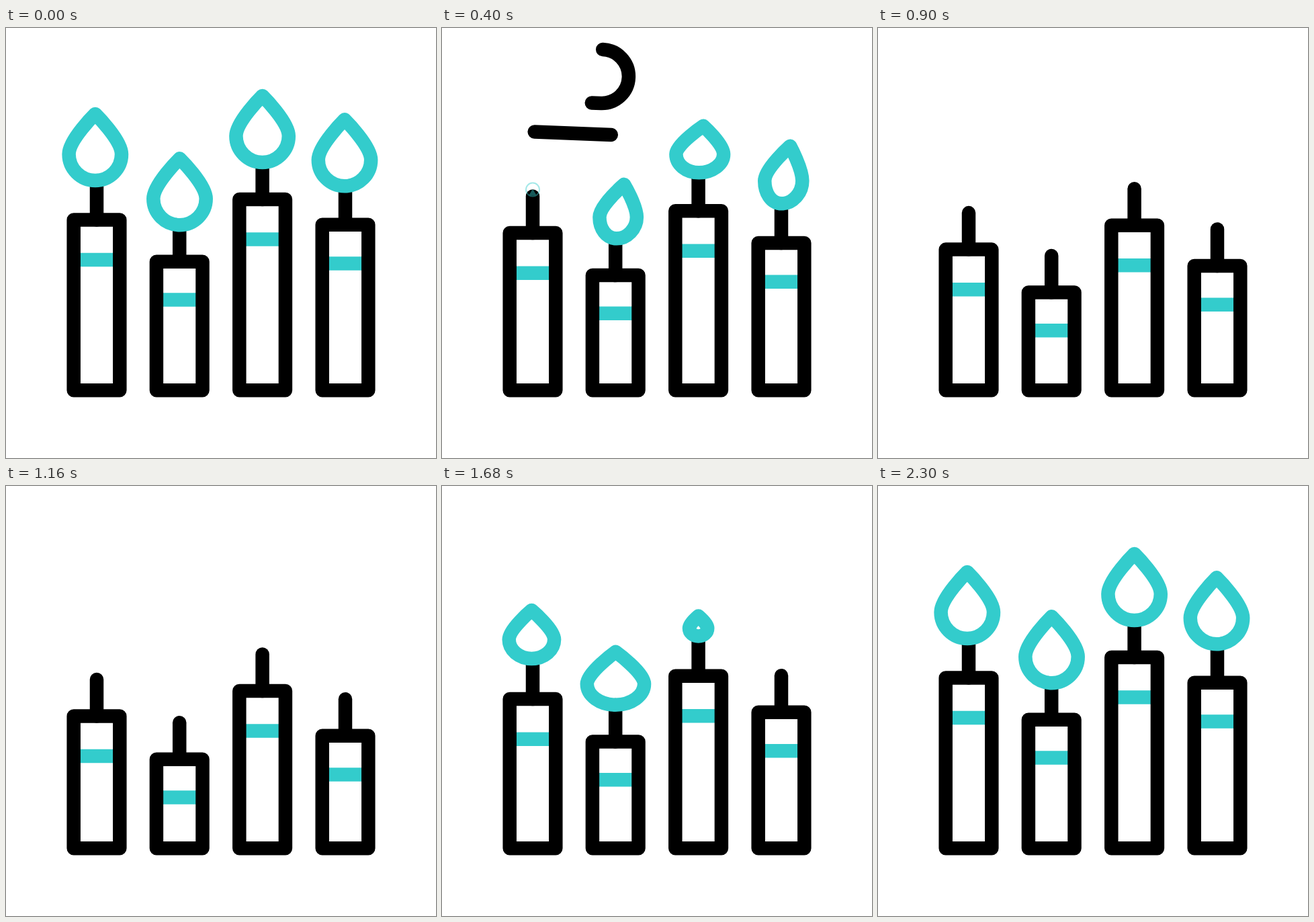
Write an HTML page that moves like this. It is 640 px wide and 640 px high and loops after 2.4 s.

```html
<!DOCTYPE html>
<html lang="en">
<head>
<meta charset="utf-8">
<title>Candles</title>
<style>
html, body { margin: 0; width: 100%; height: 100%; overflow: hidden; background: #fff; }
svg { display: block; width: 100%; height: 100%; }
.line { fill: none; stroke: #000; stroke-width: 20.5; stroke-linecap: round; stroke-linejoin: round; }
.teal { stroke: #33cccc; }
.band { stroke-linecap: butt; }
.spark { fill: #33cccc; }
.spark circle { fill: none; stroke: #33cccc; stroke-width: 2; }
</style>
</head>
<body>
<svg id="stage" viewBox="0 0 640 640"></svg>
<script>
const LOOP = 2400, LAST = 2300, STEP = 20;
const MELT = 1160, GROW = 1080, END = 2280;
const FLOOR = 539.3, WIDE = 39.2, TALL = 99, HALF = 10.25;
const stage = document.getElementById('stage');

function add(tag, cls, parent = stage) {
  const el = document.createElementNS('http://www.w3.org/2000/svg', tag);
  if (cls) el.setAttribute('class', cls);
  parent.appendChild(el);
  return el;
}
const set = (el, attrs) => { for (const k in attrs) el.setAttribute(k, attrs[k]); };
const ramp = (t, a, b) => Math.max(0, Math.min(1, (t - a) / (b - a)));

// Flame outline: base at (x, y), half width w, height h, tip pushed aside by d
function drop(x, y, w, h, d) {
  const tip = y - h, low = x - d * 0.25;
  const shoulder = tip + h * 0.39, wide = tip + h * 0.605, round = wide + h * 0.218;
  return `M${x + d} ${tip}C${x + d} ${tip} ${x + w} ${shoulder} ${x + w} ${wide}` +
    `C${x + w} ${round} ${low + w * 0.552} ${y} ${low} ${y}` +
    `C${low - w * 0.552} ${y} ${x - w} ${round} ${x - w} ${wide}` +
    `C${x - w} ${shoulder} ${x + d} ${tip} ${x + d} ${tip}Z`;
}

// die and lit are [time, easing power]; flick is [strength, cycles per loop]
function candle({ x, top, fall, band, lean, base, lift, die, gone, lit, flick }) {
  const stripe = add('path', 'line teal band');
  const wick = add('path', 'line');
  const body = add('path', 'line');
  const flame = add('path', 'line teal');
  const spark = add('g', 'spark');
  const ring = add('circle', '', spark);
  const core = add('path', '', spark);

  return t => {
    const melt = Math.max(0, Math.min(1, t / MELT, (END - t) / GROW));
    const y = top + fall * melt;
    set(stripe, { d: `M${x - 28} ${y + band}h56` });
    set(wick, { d: `M${x} ${y - 54.5}V${y}` });
    set(body, { d: `M${x - 34.3} ${y}h68.6V${FLOOR}h-68.6Z` });

    const dying = t < MELT;
    const size = dying
      ? 1 - ramp(t, 0, die[0]) ** die[1]
      : 1 - (1 - ramp(t, lit[0], END)) ** lit[1];
    const alpha = dying ? 1 - ramp(t, gone - 90, gone) : ramp(t, lit[0], lit[0] + 60);
    const stretch = Math.exp(flick[0] * Math.sin(2 * Math.PI * flick[1] * ramp(t, 0, LAST)));
    const sway = 9.5 * Math.sin(Math.PI * ramp(t, 0, 760)) * size / stretch;
    const fx = x + lean * size + sway * 0.42;
    const fy = y - base - lift * (1 - size) - 2 * HALF;
    const tiny = dying && size < 0.04;

    set(flame, { d: drop(fx, fy, WIDE * size * stretch, TALL * size, sway), opacity: tiny ? 0 : alpha });
    set(spark, { opacity: tiny ? alpha : 0 });
    set(ring, { cx: fx, cy: fy, r: 10 });
    set(core, { d: `M${fx} ${fy - 1}l6 10h-12Z` });
  };
}

const candles = [
  { x: 135, top: 285.4, fall: 57, band: 59.6, lean: -2.2, base: 38, lift: 6,
    die: [395, 2.5], gone: 440, lit: [1250, 2.4], flick: [0.18, 3] },
  { x: 258.2, top: 347.7, fall: 59, band: 56.8, lean: 0.3, base: 34, lift: 1,
    die: [655, 3.4], gone: 670, lit: [1220, 2.8], flick: [-0.35, 2.5] },
  { x: 381.6, top: 254.9, fall: 50, band: 59.6, lean: 0, base: 34.5, lift: 6,
    die: [854, 1.6], gone: 705, lit: [1480, 1.25], flick: [0.25, 1.5] },
  { x: 505, top: 292.8, fall: 79, band: 57.6, lean: -1, base: 37, lift: 9,
    die: [920, 2.4], gone: 840, lit: [1700, 1.2], flick: [0.3, 3.5] }
].map(candle);

// A stroke whose head runs ahead of its tail along a path
function gust(d, head, tail) {
  const el = add('path', 'line');
  set(el, { d });
  const len = el.getTotalLength();
  return t => {
    const a = len * ramp(t, ...tail), b = len * ramp(t, ...head);
    set(el, {
      'stroke-dasharray': `${Math.max(0.01, b - a)} ${len * 2}`,
      'stroke-dashoffset': -a,
      visibility: t > head[0] && t < tail[1] ? 'visible' : 'hidden'
    });
  };
}

const gusts = [
  gust('M96 111.5H222L236.5 112A40 40 0 0 0 239.2 32', [20, 390], [160, 664]),
  gust('M95 152.8L273.3 159.8', [50, 448], [310, 686])
];

function draw(now) {
  const t = Math.min(LAST, Math.floor((now % LOOP) / STEP) * STEP);
  candles.forEach(f => f(t));
  gusts.forEach(f => f(t));
}

let start = null;
function tick(now) {
  if (start === null) start = now;
  draw(now - start);
  requestAnimationFrame(tick);
}
draw(0);
requestAnimationFrame(tick);
</script>
</body>
</html>
```
